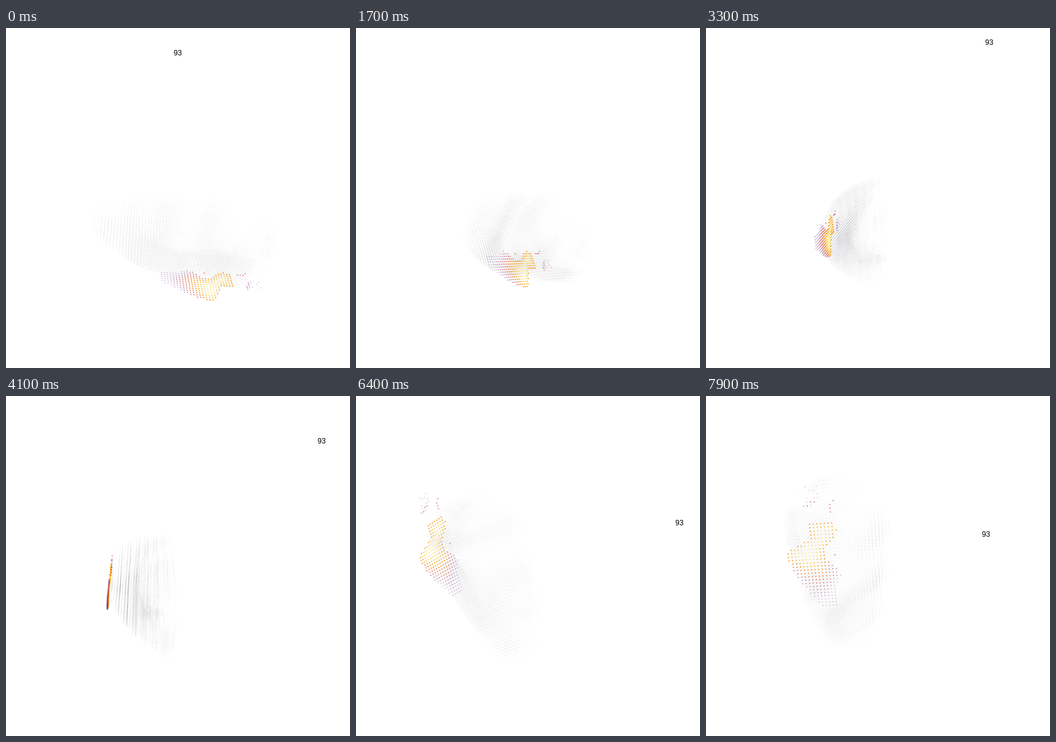
An HTML page with a canvas for the animation above (8000 ms loop, 753x744 px).

```html
<!DOCTYPE html>
<html lang="en">
<head>
<meta charset="utf-8">
<title>Rotating point cloud</title>
<style>
  html, body { margin: 0; width: 100%; height: 100%; overflow: hidden; background: #fff; }
  canvas { position: absolute; left: 0; top: 0; }
  #label {
    position: absolute; left: 0; top: 0; color: #000;
    font: 16px/18px "Liberation Sans", Arial, sans-serif;
  }
</style>
</head>
<body>
<canvas id="stage" width="753" height="744"></canvas>
<div id="label">93</div>
<script>
const LOOP = 8000, STEP = 100;
const WIDTH = 753, HEIGHT = 744, CX = 376, CY = 372;
const CAMERA = 900;    // distance from the pivot
const SPIN = 28.2;     // degrees per second
const PITCH = 6.5;     // voxel spacing

// Scene at time zero, relative to the pivot: x right, y up, z to the viewer
const AXIS = [.58, .745, -.33];
const LABEL = [0, 362, -128];
const ORIGIN = [67, -211, 48];
const U = [-.09, .5, -.86];
const W = [-.15, -.864, -.483];
const V = cross(W, U);

const ctx = document.getElementById('stage').getContext('2d');
const label = document.getElementById('label');

function cross(a, b) {
  return [a[1] * b[2] - a[2] * b[1], a[2] * b[0] - a[0] * b[2], a[0] * b[1] - a[1] * b[0]];
}
function dot(a, b) {
  return a[0] * b[0] + a[1] * b[1] + a[2] * b[2];
}
function rotate(p, angle) {
  const c = Math.cos(angle), s = Math.sin(angle);
  const side = cross(AXIS, p), along = dot(AXIS, p) * (1 - c);
  return p.map((x, i) => x * c + side[i] * s + AXIS[i] * along);
}
function project(x, y, z) {
  const q = 1 / (1 - z / CAMERA);
  return [CX + x * q, CY - y * q];
}

let seed = 93;
function rand() {
  seed = (seed * 1664525 + 1013904223) >>> 0;
  return seed / 4294967296;
}

// Thick bowl: shallow and blunt towards +v, long and sloping towards -v
function buildShell() {
  const cloud = [], back = 140;
  for (let n = -7; n <= 30; n++) {
    for (let k = -45; k <= 21; k++) {
      const u = n * PITCH, v = k * PITCH;
      const x = (u - 75) / 115, y = (v + 20) / (v > -20 ? 152 : 262);
      const power = y > 0 ? 3 : 2;
      const r = (Math.abs(x) ** power + Math.abs(y) ** power) ** (1 / power);
      const cleft = .2 * Math.exp(-(((v - 85) / 14) ** 2));
      const edge = r / (.97 + .04 * Math.sin(5 * Math.atan2(y, x)) - cleft);
      if (edge > 1) continue;
      const first = Math.ceil(back * r ** (2.2 + 4 * Math.max(0, y)) / PITCH);
      for (let layer = first; layer < first + 11 && layer * PITCH < back; layer++) {
        const w = -layer * PITCH;
        const wave = Math.sin(u / 23 + 1.5 * Math.sin(v / 37) + w / 30) * Math.cos(v / 28 - u / 60);
        const streak = .65 + .35 * Math.sin(layer * 2.1);
        const fade = Math.min(1, (1.1 - edge) * 3);
        const alpha = (.012 + .075 * (.5 + .5 * wave) ** 2) * streak * fade * (.5 + .5 * rand());
        if (edge < .88 || rand() < .6) cloud.push([u, v, w, alpha]);
      }
    }
  }
  return cloud;
}

const HEAT = ['#000004', '#420a68', '#932667', '#dd513a', '#fca50a', '#fcffa4']
  .map(hex => [1, 3, 5].map(i => parseInt(hex.slice(i, i + 2), 16)));
function heat(value) {
  const p = value * 5, i = Math.floor(p);
  const rgb = HEAT[i].map((c, j) => Math.round(c + (HEAT[i + 1][j] - c) * (p - i)));
  const alpha = Math.min(.82, Math.max(.16, value * 1.2 - .08));
  return `rgba(${rgb},${alpha.toFixed(2)})`;
}

// Flat region at the tip of the bowl: hot in the middle, cooling along the rows
function buildPatch() {
  const cells = [];
  const add = (n, row, value) => cells.push([n * PITCH, (9 - row) * PITCH, 0, heat(value)]);
  for (let row = 0; row < 25; row++) {
    const from = row < 4 ? 7 : row < 8 ? 15 - 2 * row : Math.round(8 * ((row - 8) / 16) ** 1.5);
    const to = row > 17 ? 12 : Math.round(11.8 + 1.8 * Math.cos((row - 2) * .48));
    for (let n = Math.max(0, from); n <= to; n++) {
      let value = Math.min(.96, .76 + .07 * Math.min(n - from, to - n, row));
      value -= .05 * Math.max(0, row - 9);
      if (row > 8) value -= .04 * Math.max(0, n - 9);
      add(n, row, Math.max(.22, value));
    }
  }
  add(13, 9, .6);
  for (let i = 0; i < 4; i++) {
    add(i ? 13 : 14, i - 6, .54);
    add(6 + i, -5 - (i >> 1), .38);
    for (let row = -10; row < -4; row++) if (rand() < .6) add(7 + i, row, .2);
  }
  return cells;
}

const shell = buildShell(), patch = buildPatch();

function draw(t) {
  const angle = SPIN * t / 1000 * Math.PI / 180;
  const [o, a, b, c] = [ORIGIN, U, V, W].map(p => rotate(p, angle));
  const place = ([u, v, w]) => project(
    o[0] + a[0] * u + b[0] * v + c[0] * w,
    o[1] + a[1] * u + b[1] * v + c[1] * w,
    o[2] + a[2] * u + b[2] * v + c[2] * w);

  ctx.clearRect(0, 0, WIDTH, HEIGHT);
  ctx.fillStyle = 'rgb(66,62,80)';
  for (const voxel of shell) {
    const [x, y] = place(voxel);
    ctx.globalAlpha = voxel[3];
    ctx.fillRect(x - 1.25, y - 1.25, 2.5, 2.5);
  }
  ctx.globalAlpha = 1;
  for (const cell of patch) {
    const [x, y] = place(cell);
    ctx.fillStyle = cell[3];
    ctx.beginPath();
    ctx.arc(x, y, 1.5, 0, 2 * Math.PI);
    ctx.fill();
  }
  const [x, y] = project(...rotate(LABEL, angle));
  label.style.transform = `translate(${Math.round(x)}px, ${Math.round(y)}px) translate(-50%, -50%)`;
}

const start = performance.now();
let shown = -1;
function tick() {
  const elapsed = Math.max(0, performance.now() - start) % LOOP;
  const t = Math.floor(elapsed / STEP) * STEP;
  if (t !== shown) draw(shown = t);
  requestAnimationFrame(tick);
}
tick();
</script>
</body>
</html>
```
